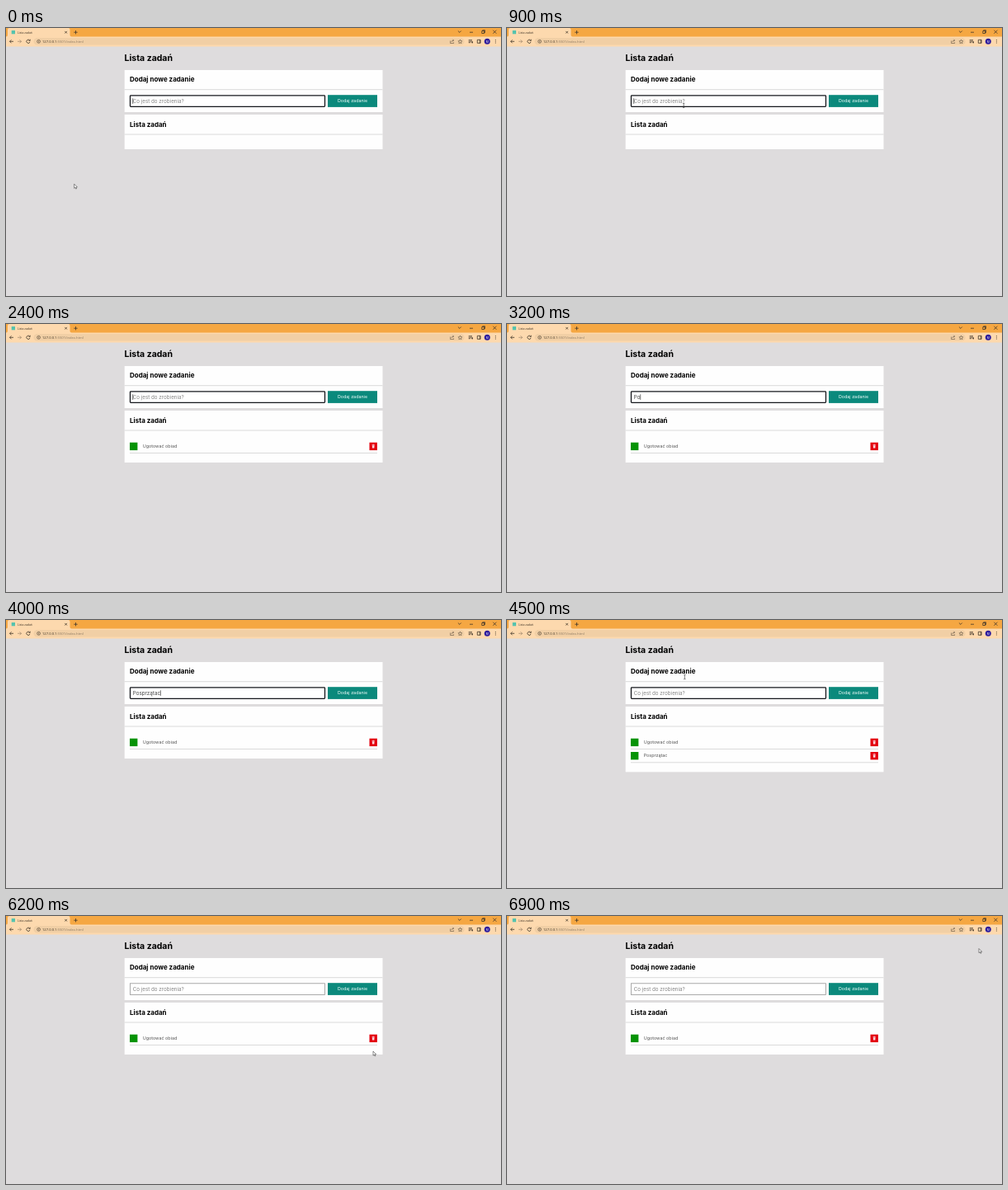
These frames come from a looping animation (600x325 px, 7 s). An HTML page:

```html
<!DOCTYPE html>
<html lang="pl">
<head>
<meta charset="utf-8">
<title>Lista zadań</title>
<style>
  html, body { margin: 0; width: 100%; height: 100%; overflow: hidden; background: #dedcdd; }
  svg { display: block; width: 100%; height: 100%; }
  text { font-family: Inter, sans-serif; fill: #000; white-space: pre; }
  .bold { font-weight: 700; }
  .h2 { font-size: 8px; }
  .chrome text { font-family: "Open Sans", sans-serif; fill: #3d3326; }
  .icon { fill: none; stroke: #40362a; stroke-width: .8; }
  .card { fill: #fefefe; }
  .rule { stroke: #d6d6d6; stroke-width: .9; }
  .label { font-size: 5.4px; fill: #555; }
  .hidden { display: none; }
</style>
</head>
<body>
<svg viewBox="0 0 600 325">
  <defs>
    <g id="row">
      <path class="rule" d="M150 156.5H450"/>
      <rect x="150" y="143.7" width="9.4" height="9.4" fill="#069306"/>
      <rect x="440.5" y="143.7" width="9.4" height="9.4" fill="#e3000f"/>
      <path d="M443.5 146.6h3.4M444.6 146h1.2" stroke="#fff" stroke-width=".6"/>
      <path d="M443.8 147.2h2.8l-.2 3.2h-2.4z" fill="#fff" opacity=".85"/>
    </g>
  </defs>

  <rect width="600" height="325" fill="#dedcdd"/>

  <g class="chrome">
    <rect width="600" height="11" fill="#f5a742"/>
    <path d="M0 10.5Q2 10.5 2 8.5V2Q2 0 4 0H75.500Q77.500 0 77.500 2V8.500Q77.500 10.500 79.500 10.500H600V22.500H0Z" fill="#fdd9ae"/>
    <rect x="33.500" y="12" width="522" height="8.600" rx="4.300" fill="#f1cfa5"/>
    <rect x="6.700" y="3" width="4.300" height="4.300" fill="#55c3ae"/>
    <text x="14" y="6.500" font-size="3.450">Lista zadań</text>
    <text x="44" y="17.900" font-size="4.130">127.0.0.1<tspan fill="#8a7862">:5501/index.html</tspan></text>
    <g class="icon">
      <path d="M71.300 3.900l2.600 2.600m0-2.600l-2.600 2.600M82.300 5.200h4.400m-2.200-2.200v4.400"/>
      <path d="M547.900 3.500l1.900 1.900 1.900-1.900M562 5.200h4M590.400 2.700l4 4m0-4l-4 4"/>
      <path d="M576.800 3.600h2.800v2.900h-2.800zM577.700 3.600v-.9h2.800v2.900h-.9"/>
      <path d="M9 16.300H4.500m2-2l-2 2 2 2"/>
      <path d="M14 16.300h4.500m-2-2l2 2-2 2" opacity=".45"/>
      <path d="M28.700 15.100a2.100 2.100 0 1 0 .3 1.700M29.200 13.700v1.700h-1.700"/>
      <circle cx="39.600" cy="16.300" r="1.900" stroke-width=".6"/>
      <path d="M39.600 16v1.200M39.600 15.100v.4" stroke-width=".6"/>
      <path d="M538.600 15.500v3h4v-1.200M539.900 17q.3-2 2.700-2m-1.100-1.200l1.200 1.200-1.200 1.200" stroke-width=".5"/>
      <path d="M550.500 14l.7 1.600 1.700.2-1.300 1.200.3 1.700-1.400-.9-1.500.9.3-1.700-1.200-1.200 1.700-.2z" stroke-width=".5"/>
      <path d="M560.700 14.700h4.300m-4.300 1.500h4.300m-4.300 1.500h2.200m1 0h1.600m0-1.500v2.100"/>
      <path d="M571.300 14.300h3.800v4h-3.800zM574.300 14.300v4"/>
    </g>
    <circle cx="583.300" cy="16.300" r="3.500" fill="#2d1c9c"/>
    <text x="583.300" y="17.500" font-size="3.300" text-anchor="middle" style="fill:#fff">M</text>
    <path d="M593.300 14.500v4.500" stroke="#40362a" stroke-linecap="round" stroke-dasharray="0 1.800"/>
  </g>

  <text class="bold" x="143.500" y="39.700" font-size="10.500">Lista zadań</text>

  <rect class="card" x="143.700" y="51" width="312.800" height="51"/>
  <path class="rule" d="M143.700 74.700H456.500"/>
  <text class="bold h2" x="150" y="65.200">Dodaj nowe zadanie</text>
  <rect id="field" x="150.500" y="81.800" width="236" height="13.600" fill="#fff"/>
  <text id="entry" x="153.700" y="90.900" font-size="6.260"></text>
  <path id="caret" d="M0 85.300V91.900" stroke="#111" stroke-width=".6"/>
  <rect x="390" y="81.200" width="60" height="14.700" fill="#0b897c"/>
  <text x="420" y="90.200" font-size="5.360" text-anchor="middle" style="fill:#f4fffd">Dodaj zadanie</text>

  <rect id="list" class="card" x="143.700" y="105" width="312.800"/>
  <path class="rule" d="M143.700 129H456.500"/>
  <text class="bold h2" x="150" y="119.500">Lista zadań</text>
  <g id="first">
    <use href="#row"/>
    <text class="label" x="165.700" y="150.200">Ugotować obiad</text>
  </g>
  <g id="second" transform="translate(0 16.300)">
    <use href="#row"/>
    <text class="label" x="165.700" y="150.200">Posprzątac</text>
    <g id="done" fill="none">
      <path d="M152.600 148.500l1.300 1.400 2.700-3" stroke="#fff" stroke-width="1.100"/>
      <path id="strike" d="M165.400 148.300H194.300" stroke="#333" stroke-width=".7"/>
    </g>
  </g>

  <g id="pointer">
    <path id="arrow" d="M0 0V5.200L1.200 4.100 2 5.900 2.900 5.500 2.100 3.800H3.700Z" fill="#fff" stroke="#333" stroke-width=".55"/>
    <path id="beam" d="M-1.200-2.800Q0-2.800 0-2V2Q0 2.800-1.200 2.800M1.200-2.800Q0-2.800 0-2M0 2Q0 2.800 1.200 2.800" fill="none" stroke="#333" stroke-width=".6"/>
  </g>
</svg>
<script>
const LOOP = 7000, STEP = 100, BLINK = 400;
const $ = id => document.getElementById(id);
const show = (id, on) => $(id).classList.toggle("hidden", !on);

// Each task: first key press, ms per key, moment of Enter
const tasks = [
  { text: "Ugotować obiad", start: 1520, pace: 60, enter: 2400 },
  { text: "Posprzątac", start: 3100, pace: 100, enter: 4100 }
];
const BLUR = 4700, CHECK = 5100, REMOVE = 6200;

// Pointer path: time, x, y
const path = [
  [0, 82.7, 189.2], [100, 82.7, 189.2], [500, 150, 160], [800, 213, 119],
  [1000, 215.4, 69], [4500, 215.4, 69], [4600, 160, 135], [4700, 112.500, 182.500],
  [4800, 142.500, 166], [5000, 154, 164], [5300, 154, 164], [5500, 255, 165],
  [5700, 382, 167], [5900, 445, 164], [6200, 445, 164], [6400, 466.500, 142],
  [6600, 525, 82], [6800, 572, 39.500], [7000, 572, 39.500]
];

function pointerAt(t) {
  const i = path.findIndex(p => p[0] > t);
  const [t0, x0, y0] = path[i - 1], [t1, x1, y1] = path[i];
  const k = (t - t0) / (t1 - t0);
  return [x0 + (x1 - x0) * k, y0 + (y1 - y0) * k];
}

function draw(t) {
  const focused = t < BLUR;
  const task = tasks.find(k => t >= k.start && t < k.enter);
  const typed = task ? task.text.slice(0, Math.floor((t - task.start) / task.pace + 1)) : "";
  const entry = $("entry");
  entry.textContent = typed || "Co jest do zrobienia?";
  entry.style.fill = typed ? "#444" : "#858585";

  const field = $("field");
  field.setAttribute("stroke", focused ? "#15171c" : "#969696");
  field.setAttribute("stroke-width", focused ? 1.3 : .8);
  field.setAttribute("rx", focused ? .8 : 0);

  const lastEnter = Math.max(0, ...tasks.map(k => k.enter).filter(e => e <= t));
  show("caret", focused && (typed || (t - lastEnter) % (2 * BLINK) < BLINK));
  const caretX = 153.7 + (typed ? entry.getComputedTextLength() + .3 : 0);
  $("caret").setAttribute("transform", `translate(${caretX})`);

  const first = t >= tasks[0].enter;
  const second = t >= tasks[1].enter && t < REMOVE;
  show("first", first);
  show("second", second);
  show("done", t >= CHECK);
  $("list").setAttribute("height", second ? 79.3 : first ? 63 : 42);

  const [x, y] = pointerAt(t);
  const overText = y < 100 && x < 388;
  show("pointer", t < tasks[0].start || t >= 4500);
  show("arrow", !overText);
  show("beam", overText);
  $("pointer").setAttribute("transform", `translate(${x} ${y})`);
}

function tick() {
  draw(Math.floor(performance.now() % LOOP / STEP) * STEP);
  requestAnimationFrame(tick);
}
tick();
</script>
</body>
</html>
```
